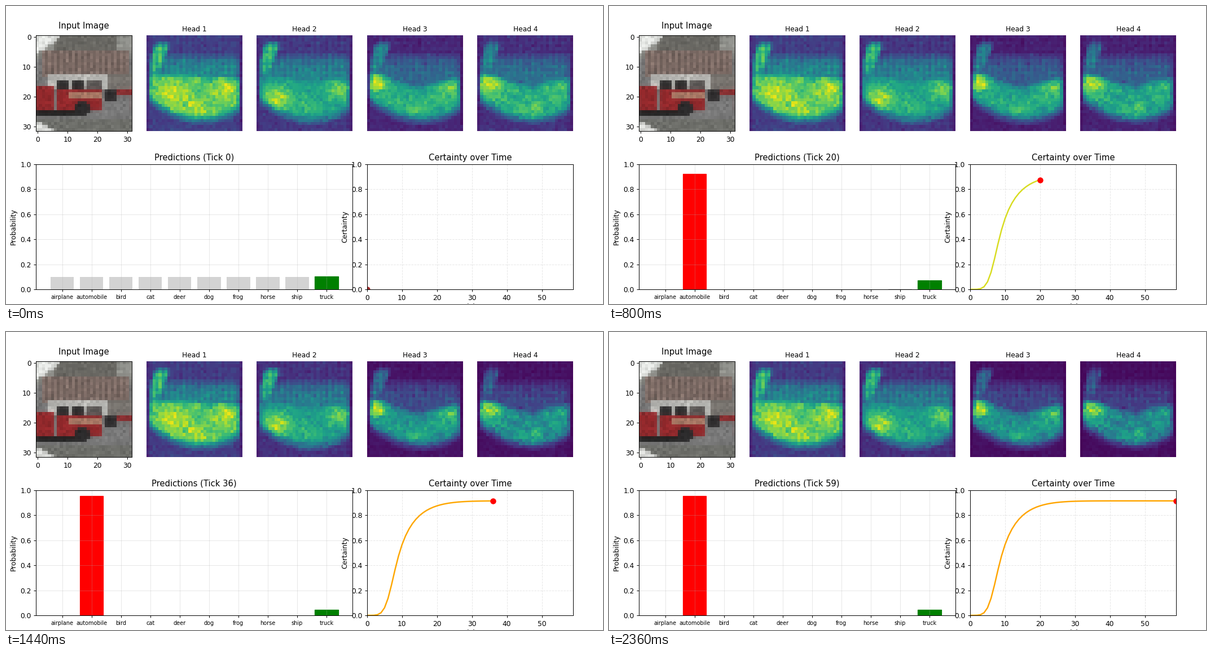
Recreate the animation shown at these times as a matplotlib script. Size 1058 px wide and 529 px high, loop 2400 ms.

```python
import numpy as np
import matplotlib.pyplot as plt
from matplotlib.animation import FuncAnimation
from matplotlib.colors import to_rgb

W, H = 1058, 529
TICKS = 60
N = 32
CLASSES = ["airplane", "automobile", "bird", "cat", "deer",
           "dog", "frog", "horse", "ship", "truck"]
TRUE_CLASS = CLASSES.index("truck")

Y, X = np.mgrid[0:N, 0:N].astype(float)


def rise(d, soft=0.8):
    return 1 / (1 + np.exp(-d / soft))


def bump(cx, cy, rx, ry):
    return np.exp(-((X - cx) / rx) ** 2 - ((Y - cy) / ry) ** 2)


def settle(t, tau, power):
    return 1 - np.exp(-(t / tau) ** power)


# ---- class probabilities (softmax) and certainty (entropy) per tick ----
t = np.arange(TICKS)
logits = np.repeat(-9 * settle(t, 11.7, 2.5)[:, None], len(CLASSES), axis=1)
logits[:, CLASSES.index("airplane")] *= 5 / 9
logits[:, CLASSES.index("automobile")] = 3.11 * settle(t, 15.3, 2.1)
logits[:, CLASSES.index("ship")] = -3.3 * settle(t, 14, 3)
logits[:, TRUE_CLASS] = .03
probs = np.exp(logits)
probs /= probs.sum(axis=1, keepdims=True)
entropy = -(probs * np.log(probs)).sum(axis=1)
certainty = 1 - entropy / np.log(len(CLASSES))


# ---- pixelated street scene ----
def street_scene():
    rng = np.random.default_rng(4)
    img = np.full((N, N, 3), .48)

    def paint(color, mask):
        img[mask] = to_rgb(color)

    def box(color, c0, c1, r0, r1):
        paint(color, (X >= c0) & (X < c1) & (Y >= r0) & (Y < r1))

    box("#8d8e89", 0, 32, 0, 8)
    box("#696863", 6, 27, 0, 5)
    box("#7a6963", 2, 31, 5, 14)
    box("#77736e", 24, 32, 13, 18)
    paint("#e2e4e1", X + 1.4 * Y < 8)
    box("#b9b9b5", 4, 24, 13, 18)
    for c in (7, 12):
        box("#2f2d2d", c, c + 4, 15, 18)
    box("#5a5654", 17, 22, 15, 18)
    box("#93292c", 0, 6, 17, 25)
    box("#93292c", 7, 22, 18, 25)
    box("#a57a66", 11, 22, 19, 21)
    box("#2f2d2e", 23, 27, 18, 22)
    box("#8b2c2e", 27, 32, 18, 20)
    box("#232323", 0, 17, 25, 27)
    paint("#2b2a2b", np.hypot(X - 15, Y - 24) < 2.6)
    paint("#6d6e69", Y > 27)
    paint("#d6d7d4", (Y >= 29) & (X < 2 * (Y - 28.4)))

    near = sum(np.roll(img, s, axis) for s in (-1, 1) for axis in (0, 1)) / 4
    img = .75 * img + .25 * near
    stripes = .07 * np.cos(np.pi * X) * ((Y > 4) & (Y < 13))
    shade = 1 + stripes + rng.normal(0, .05, (N, N))
    return np.clip(img * shade[..., None], 0, 1)


# ---- attention maps ----
def attention(seed, sky, mid, body, sag, stem, peak, left, right):
    """Bowl-shaped band with a stem at the upper left and two bright ends."""
    rng = np.random.default_rng(seed)
    side = rise(X - .4, .3) * rise(30.4 - X, .3)
    floor = 27.8 - 5 * ((X - 16) / 15) ** 2 + .08 * (X - 16)
    roof = 11.5 + .05 * X + sag * np.exp(-((X - 16) / 9) ** 2)

    level = (body + left * bump(*peak, 5, 4) + right * bump(27, 17, 4.5, 4)
             + .1 * bump(16.5, 24.5, 5, 3))
    band = level * rise(Y - roof, .8) * rise(floor - Y, .7) * side
    haze = mid * rise(Y - 6, 1.5) * rise(floor + 1.5 - Y) * side
    arm = stem * np.exp(-((X - 5.5 + .3 * Y) / 2.8) ** 4)
    arm *= rise(Y - 1.8, .5) * rise(13 - Y) * side
    v = np.max([sky * (.6 + .4 * side), band, haze, arm], axis=0)

    weave = np.cos(np.pi * X) + .6 * np.cos(np.pi * Y)
    patches = np.kron(rng.normal(0, .04, (N // 2, N // 2)), np.ones((2, 2)))
    v *= 1 + .08 * weave * rise(13 - Y) + patches
    v += rng.normal(0, .035, (N, N)) * (.4 + v)
    return np.clip(v, .01, .97)


HEADS = [
    attention(1, .19, .48, .76, 0, .66, (8, 18.5), .15, .13),
    attention(2, .17, .44, .57, 1, .66, (6, 21), .35, .23),
    attention(3, .11, .34, .60, 3.5, .46, (1.5, 14.5), .38, .2),
    attention(4, .14, .37, .62, 3, .46, (3, 15.5), .30, .08),
]
SHARPEN = [.05, .1, .45, .7]  # how much each map concentrates over time


# ---- figure ----
fig = plt.figure(figsize=(12, 6), dpi=W / 12)
LEFT, CELL, STEP = 53.2, 169.9, 195.55


def panel(x, y, w, h):
    return fig.add_axes([x / W, 1 - (y + h) / H, w / W, h / H])


def show(ax, data):
    return ax.imshow(data, cmap="viridis", vmin=0, vmax=1,
                     interpolation="nearest", aspect="auto")


ax = panel(LEFT, 52.2, CELL, CELL)
show(ax, street_scene())
ax.set_title("Input Image", pad=10)
ax.set_xticks(range(0, N, 10))
ax.set_yticks(range(0, N, 10))

maps = []
for i, data in enumerate(HEADS, 1):
    ax = panel(LEFT + i * STEP, 52.2, CELL, CELL)
    maps.append(show(ax, data))
    ax.set_title(f"Head {i}", fontsize=10)
    ax.axis("off")

pred_ax = panel(LEFT, 281, 2 * STEP + CELL, 222)
bars = pred_ax.bar(CLASSES, probs[0])
pred_ax.set_xlim(-.89, 9.89)
pred_ax.set_ylim(0, 1)
pred_ax.tick_params(axis="x", labelsize=8)
pred_ax.set_ylabel("Probability")
pred_ax.grid(True, alpha=.3)
pred_title = pred_ax.set_title("Predictions (Tick 0)")

cert_ax = panel(LEFT + 3 * STEP, 281, STEP + CELL, 222)
line, = cert_ax.plot([], [], lw=2)
dot, = cert_ax.plot([], [], "o", ms=7.5)
cert_ax.set_xlim(0, TICKS - 1)
cert_ax.set_ylim(0, 1)
cert_ax.set_xlabel("Tick", labelpad=3)
cert_ax.set_ylabel("Certainty")
cert_ax.set_title("Certainty over Time")
cert_ax.grid(True, linestyle="--", alpha=.3)

YELLOW, ORANGE = np.array([to_rgb("#d8dc20"), to_rgb("orange")])


def ramp(n, start, end):
    s = np.clip((n - start) / (end - start), 0, 1)
    return s * s * (3 - 2 * s)


def update(n):
    focus = ramp(n, 5, 50)
    for im, data, k in zip(maps, HEADS, SHARPEN):
        im.set_data(data ** (1 + k * focus))

    best = np.argmax(probs[n])
    for i, (bar, p) in enumerate(zip(bars, probs[n])):
        wrong = "red" if i == best else "lightgray"
        color = "green" if i == TRUE_CLASS else wrong
        bar.set_height(p)
        bar.set_color(color)
        bar.set_linewidth(0 if color == "lightgray" else 1)
    pred_title.set_text(f"Predictions (Tick {n})")

    line.set_data(t[:n + 1], certainty[:n + 1])
    line.set_color(YELLOW + (ORANGE - YELLOW) * ramp(n, 20, 38))
    dot.set_data([n], [certainty[n]])
    dot.set_color("brown" if best == TRUE_CLASS else "red")
    return [*maps, *bars, pred_title, line, dot]


anim = FuncAnimation(fig, update, frames=TICKS, interval=40,
                     repeat=True, repeat_delay=0, blit=False)
plt.show()
```
